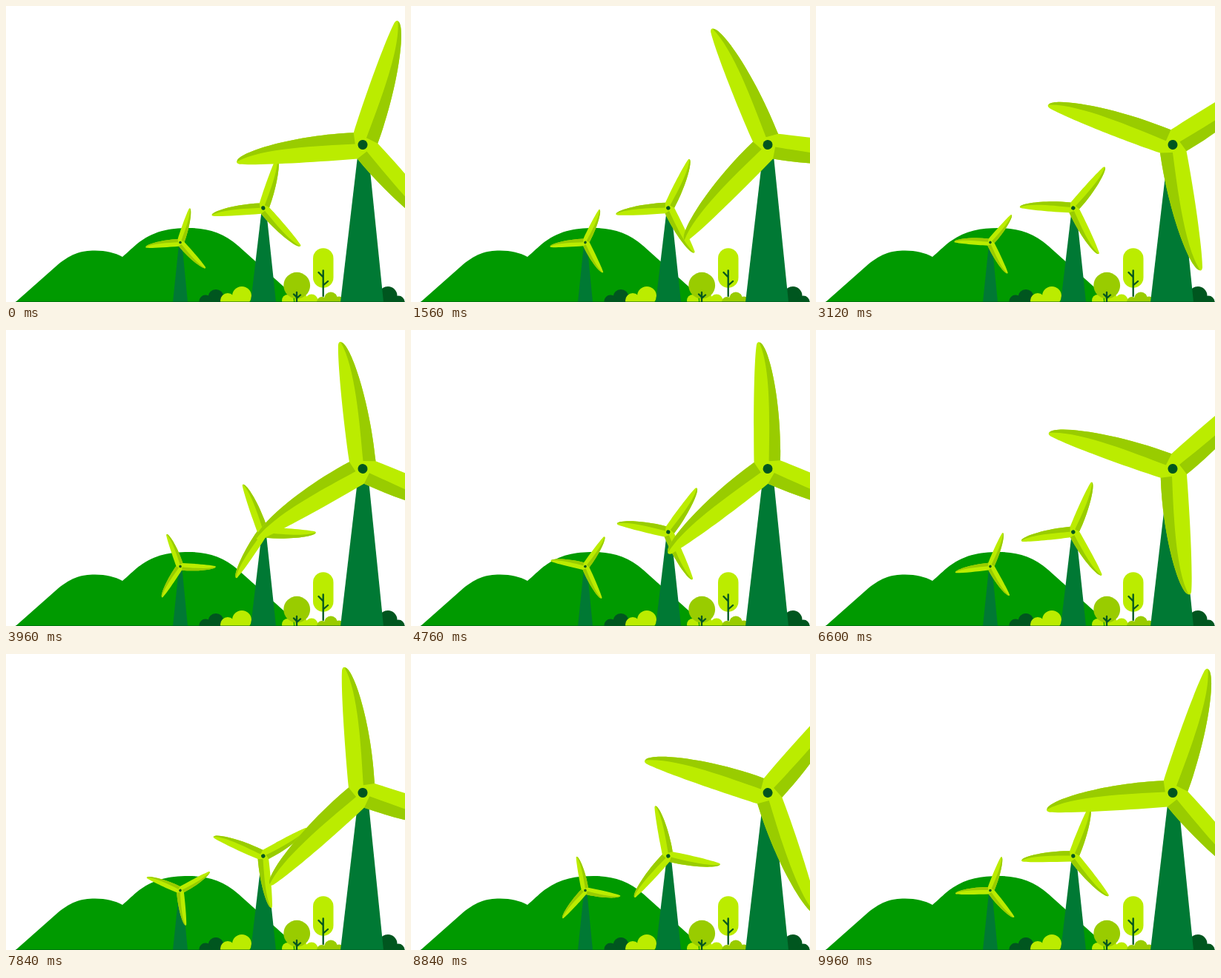
An HTML page for the animation above (10000 ms loop, 538 by 400 pixels).

```html
<!DOCTYPE html>
<html lang="en">
<head>
<meta charset="utf-8">
<title>Wind turbines</title>
<style>
  html, body { margin: 0; width: 100%; height: 100%; overflow: hidden; background: #fff; }
  svg { display: block; width: 538px; height: 400px; }
  .hill { fill: #009a00; }
  .tower { fill: #007934; }
  .lime { fill: #bbec00; }
  .olive { fill: #99cc00; }
  .dark { fill: #00561f; }
  .twig { fill: none; stroke: #00561f; stroke-width: 2.3; stroke-linecap: round; }
</style>
</head>
<body>
<svg viewBox="0 0 538 400">
  <defs>
    <g id="rotor">
      <path id="blades" class="lime"/>
      <path id="shade" class="olive"/>
      <circle class="dark" r="6.5"/>
    </g>
  </defs>

  <path class="hill" d="M13 400L66 353C86 335 101 330.5 120 330.5C135 330.5 147 333.5 157 339C165 332 168 329 176 322C198 304 220 300 246 300C270 300 293 306 313 324L397.500 400Z"/>

  <path class="tower" d="M233.200 321H237.300L245 400H225Z"/>
  <use href="#rotor" class="breeze" data-at="235 319.500" data-scale=".275"/>

  <g class="dark">
    <circle cx="283" cy="393.5" r="10.5"/><circle cx="269" cy="399" r="8.5"/>
    <circle cx="515" cy="391.5" r="12.5"/><circle cx="529" cy="400" r="8.5"/>
  </g>
  <g class="lime">
    <circle cx="318" cy="392" r="13"/><circle cx="299" cy="398" r="10"/>
    <circle cx="380" cy="398" r="8"/><circle cx="398" cy="397" r="9"/><circle cx="412" cy="398" r="8.5"/>
    <rect x="414" y="327.3" width="27.5" height="53.5" rx="13.75"/>
  </g>
  <g class="olive">
    <circle cx="392.2" cy="377.7" r="17.9"/>
    <circle cx="438" cy="395.5" r="9"/><circle cx="426" cy="400" r="7"/><circle cx="449" cy="399" r="6.5"/>
  </g>
  <path class="twig" d="M392 387V400M392 393.500L388 389.500M392 395L397 390.500M427.700 357.500V392M427.700 366.500L421.500 360M427.700 377.500L434 372"/>

  <path class="tower" d="M344.800 275H350.800L364 400H330Z"/>
  <use href="#rotor" class="breeze" data-at="346.800 273" data-scale=".408"/>

  <path class="tower" d="M475 195H488.200L509 400H451Z"/>
  <rect class="dark" x="13" y="399" width="525" height="1" opacity=".5"/>
  <use href="#rotor" class="gust" data-at="481 187.500" data-scale="1"/>
</svg>
<script>
const LOOP = 10000, START = 262.2;

// Blades are unevenly spaced: tip angle, tip length, root corner angles from the tip.
const BLADES = [
  [0, 171.5, -61.5, 60.5],
  [113.5, 174, -53, 69.5],
  [233.6, 176.5, -50.6, 64.9]
];

function bladePaths([angle, length, left, right]) {
  const spin = (x, y, deg) => {
    const a = deg * Math.PI / 180;
    return [x * Math.cos(a) - y * Math.sin(a), x * Math.sin(a) + y * Math.cos(a)]
      .map(v => v.toFixed(2)).join(' ');
  };
  const pt = (x, y) => spin(x, y * length / 171.5, angle);
  const corner = deg => spin(0, -20.3, angle + deg);
  const rightEdge = `C${pt(14, -162)} ${pt(25, -85)} ${corner(right)}`;
  return {
    full: `M${corner(left)}C${pt(-14.5, -70)} ${pt(-8.5, -145)} ${pt(-3.5, -168)}` +
      `Q${pt(-1.5, -173.5)} ${pt(2, -170.5)}${rightEdge}L0 0Z`,
    shade: `M${pt(2.3, -10)}C${pt(6.5, -60)} ${pt(14, -135)} ${pt(0.5, -171)}` +
      `L${pt(2, -170.5)}${rightEdge}Z`
  };
}

const paths = BLADES.map(bladePaths);
document.getElementById('blades').setAttribute('d', paths.map(p => p.full).join(''));
document.getElementById('shade').setAttribute('d', paths.map(p => p.shade).join(''));

// Cubic bezier easing (x1, 0, x2, 1), solved by bisection.
function ease(x, x1 = 0.584, x2 = 0.426) {
  let lo = 0, hi = 1;
  for (let i = 0; i < 30; i++) {
    const s = (lo + hi) / 2, u = 1 - s;
    if (3 * x1 * s * u * u + 3 * x2 * s * s * u + s ** 3 < x) lo = s; else hi = s;
  }
  return lo * lo * (3 - 2 * lo);
}

const rotors = document.querySelectorAll('use');
const begin = performance.now();

function draw() {
  const p = (performance.now() - begin) % LOOP / LOOP;
  for (const r of rotors) {
    const turns = r.classList.contains('gust') ? 4 * ease(p) : 2 * p;
    r.setAttribute('transform',
      `translate(${r.dataset.at}) rotate(${START - 360 * turns}) scale(${r.dataset.scale})`);
  }
  requestAnimationFrame(draw);
}
draw();
</script>
</body>
</html>
```
